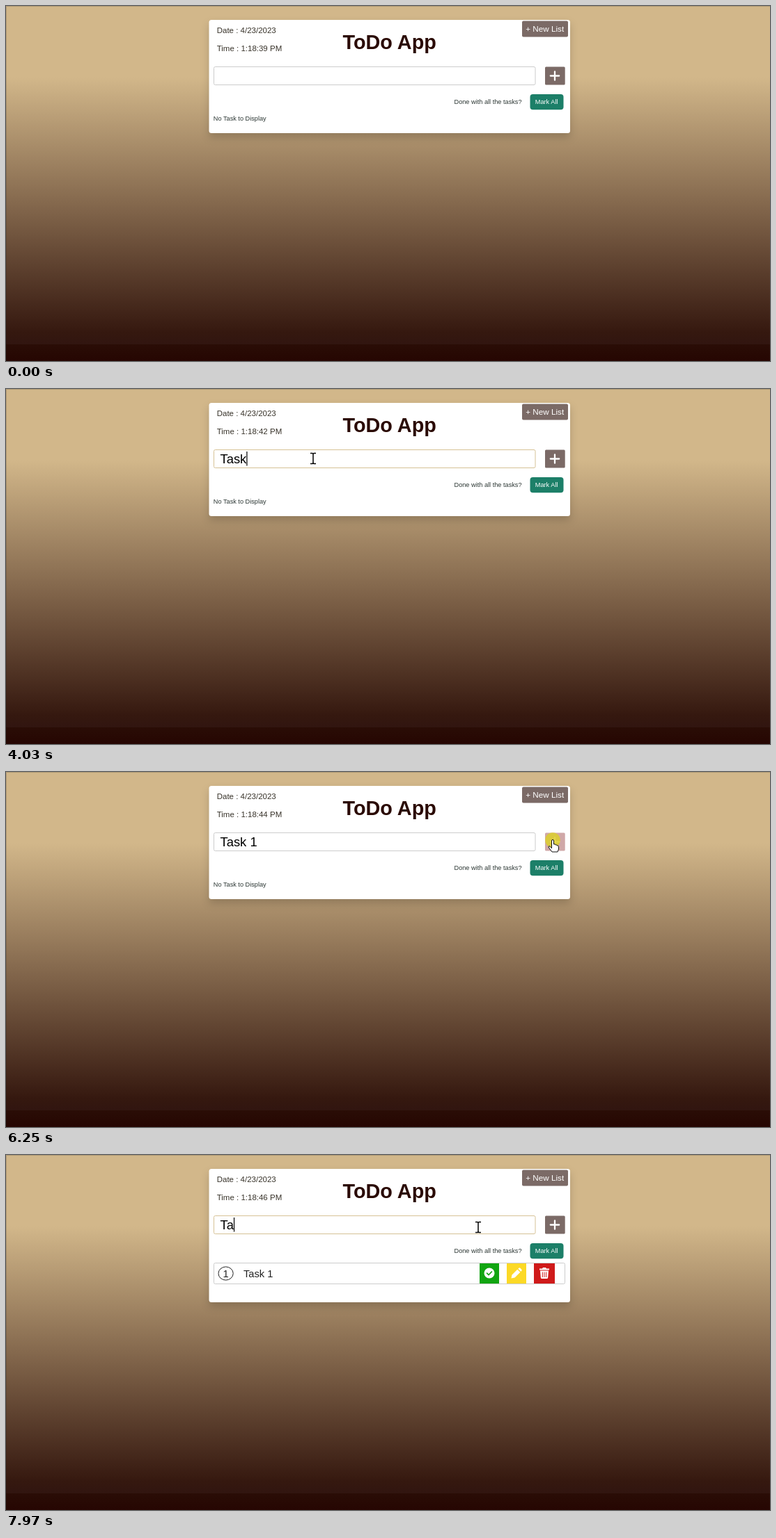
Animation of 1097x511 px, one loop 8 s. Source, as an HTML page:

```html
<!DOCTYPE html>
<html lang="en">
<head>
<meta charset="utf-8">
<title>ToDo App</title>
<style>
  html, body { margin: 0; width: 100%; height: 100%; overflow: hidden; }
  svg { display: block; width: 1097px; height: 511px; font: 11.5px "Liberation Sans", Arial, sans-serif; }
  text { white-space: pre; fill: #38332a; }
  .small { font-size: 9.2px; fill: #2b3633; }
  .light { fill: #fff; }
  .box { fill: #fff; stroke: #ccc; }
  #card { fill: #fff; filter: drop-shadow(0 6px 6px rgba(0, 0, 0, .17)); }
  #input { font-size: 18.4px; fill: #000; }
</style>
</head>
<body>
<svg viewBox="0 0 1097 511">
  <defs>
    <linearGradient id="sky" x1="0" y1="0" x2="0" y2="1">
      <stop offset=".2" stop-color="#d2b78a"/>
      <stop offset=".92" stop-color="#35180f"/>
      <stop offset=".953" stop-color="#311510"/>
      <stop offset=".953" stop-color="#2a0d06"/>
      <stop offset="1" stop-color="#260602"/>
    </linearGradient>
  </defs>
  <rect width="1097" height="511" fill="url(#sky)"/>
  <path d="M1097 .5H.5V511" fill="none" stroke="#000" stroke-opacity=".16"/>

  <rect id="card" x="291.5" y="20" width="518.5" height="163" rx="3.5"/>
  <text x="302.7" y="38.5">Date : 4/23/2023</text>
  <text x="302.7" y="65" id="clock"></text>
  <text x="483.5" y="62" font-size="28.8" font-weight="bold" style="fill:#2a0a04">ToDo App</text>
  <rect x="741" y="21.5" width="66" height="23" rx="2" fill="#7b6a66"/>
  <text x="746.3" y="37" font-size="11.7" class="light">+ New List</text>

  <rect id="field" class="box" x="298.5" y="87.5" width="461.5" height="26" rx="2"/>
  <text id="input" x="307.5" y="106.5"></text>
  <rect id="caret" y="90" width="1.2" height="20.5"/>
  <rect id="add" x="774" y="87.5" width="28.7" height="26" rx="1.5"/>
  <path d="M781.8 100.5h12.4M788 94.3v12.4" stroke="#fff" stroke-width="2.3" stroke-linecap="round"/>

  <text x="643.5" y="140.5" class="small">Done with all the tasks?</text>
  <rect x="752.5" y="127" width="48" height="22.3" rx="4" fill="#1c7f68"/>
  <text x="759.8" y="141" class="small light">Mark All</text>
  <text id="empty" x="297.8" y="164.7" class="small">No Task to Display</text>

  <g id="task">
    <rect class="box" x="298.5" y="155.5" width="504" height="30" rx="2"/>
    <ellipse cx="315.6" cy="170.5" rx="10.6" ry="9.6" fill="none" stroke="#222"/>
    <text x="315.6" y="175.8" font-size="14.7" text-anchor="middle" style="fill:#222">1</text>
    <text x="341" y="175.8" font-size="14.7" style="fill:#222">Task 1</text>
    <path d="M680 156h28v29h-28z" fill="#12a512"/>
    <circle cx="694" cy="170" r="7.5" fill="#fff"/>
    <path d="M690.6 170.2l2.4 2.4 4.4-4.6" fill="none" stroke="#12a512" stroke-width="1.7" stroke-linecap="round"/>
    <path d="M719 156h28v29h-28z" fill="#fcd926"/>
    <path transform="translate(725 162)" fill="#fff"
      d="M.5 15.5l1-5L9.300 2.700l4 4L5.500 14.500zM10.300 1.700l1-1q1-.8 2 0l2 2q.8 1 0 2l-1 1z"/>
    <path d="M758 156h30v29h-30z" fill="#cf1a1a"/>
    <g transform="translate(765.500 162)">
      <path d="M.5 1.500h4L5.500 0h4l1 1.500h4v2H.500zM1.500 4.500h12l-.8 10q-.2 1.500-1.700 1.500H4q-1.500 0-1.700-1.500z" fill="#fff"/>
      <path d="M4.800 6.500v7.500M7.500 6.500v7.500M10.200 6.500v7.500" stroke="#cf1a1a"/>
    </g>
  </g>

  <circle id="click" r="10.8" fill="#dccf2c" fill-opacity=".85"/>
  <g id="cursor" stroke-linejoin="round">
    <path id="arrow" d="M0 0v16l3.700-3.500 2.500 6 2.500-1-2.500-5.800h5.200z" fill="#fff" stroke="#000"/>
    <path id="beam" d="M-4-7.500h3l1 1 1-1h3M-4 7.500h3l1-1 1 1h3M0-6.500v13" fill="none" stroke="#000" stroke-width="1.500"/>
    <path id="hand" d="M-1.500 1q0-1.500 1.500-1.500T1.500 1v5q2.500-.8 2.700 1 2-.6 2.300 1 2-.4 2 1.500v3.500l-1.500 4h-8l-4.500-6q-1.300-2 .5-2.300 1 0 2 1.600l1.500 1.500z" fill="#fff" stroke="#111"/>
  </g>
</svg>
<script>
const $ = id => document.getElementById(id);
const LOOP = 8000;

// Steps: [start time, value]; the latest one counts.
const seconds = [[0, 39], [1000, 40], [2000, 41], [3000, 42], [5700, 44], [7390, 46]];
const typing = [[0, ""], [3350, "T"], [3540, "Ta"], [3790, "Tas"], [4030, "Task"], [4320, "Task "],
  [4700, "Task 1"], [6390, ""], [7670, "T"], [7970, "Ta"]];
const clicks = [[2450, 200], [6130, 260], [7070, 200]];
// Pointer stops: [time, x, y]
const route = [[810, 1075, 480], [1150, 850, 256], [1430, 850, 256], [1580, 523, 92.5], [2250, 441, 100],
  [5240, 441, 100], [6010, 785, 98], [6560, 785, 98], [6870, 678, 104]];

const latest = (steps, t) => steps.findLast(s => s[0] <= t);
const ramp = (t, start, length = 150) => Math.min(1, Math.max(0, (t - start) / length));
const mix = (a, b, k) => `rgb(${a.map((v, i) => v + (b[i] - v) * k)})`;
const show = (id, on) => $(id).setAttribute("visibility", on ? "visible" : "hidden");

function pointer(t) {
  const i = route.findIndex(p => p[0] > t);
  if (i < 1) return route.at(i).slice(1);
  const [t0, x0, y0] = route[i - 1], [t1, x1, y1] = route[i];
  let k = (t - t0) / (t1 - t0);
  if (t0 > 5000) k = k * k * (3 - 2 * k);
  return [x0 + (x1 - x0) * k, y0 + (y1 - y0) * k];
}

function draw(t) {
  $("clock").textContent = `Time : 1:18:${latest(seconds, t)[1]} PM`;
  const [typedAt, typed] = latest(typing, t);
  $("input").textContent = typed;

  const focus = ramp(t, 2450) - ramp(t, 6130, 110) + ramp(t, 7070);
  $("field").style.stroke = mix([204, 204, 204], [214, 194, 150], focus);
  const focused = t >= 2450 && t < 6130 || t >= 7070;
  const active = Math.max(typedAt, t < 7070 ? 2450 : 7070);
  show("caret", focused && (t - active) % 1060 < 530);
  $("caret").setAttribute("x", 307.5 + (typed ? $("input").getComputedTextLength() : 0));

  const hover = ramp(t, 5930) - ramp(t, 6630);
  $("add").style.fill = mix([123, 106, 102], [208, 168, 168], hover);

  const added = t >= 6390;
  $("card").setAttribute("height", added ? 192 : 163);
  show("task", added);
  show("empty", !added);

  const [x, y] = pointer(t);
  const inRow = t >= 810 && y > 87 && y < 114;
  const beam = inRow && x > 298 && x < 760;
  const hand = inRow && x > 774 && x < 803;
  show("beam", beam);
  show("hand", hand);
  show("arrow", t >= 810 && !beam && !hand);
  for (const id of ["cursor", "click"]) $(id).setAttribute("transform", `translate(${x} ${y})`);
  show("click", clicks.some(([start, length]) => t >= start && t < start + length));
}

const begin = performance.now();
function frame() {
  draw((performance.now() - begin) % LOOP);
  requestAnimationFrame(frame);
}
frame();
</script>
</body>
</html>
```
